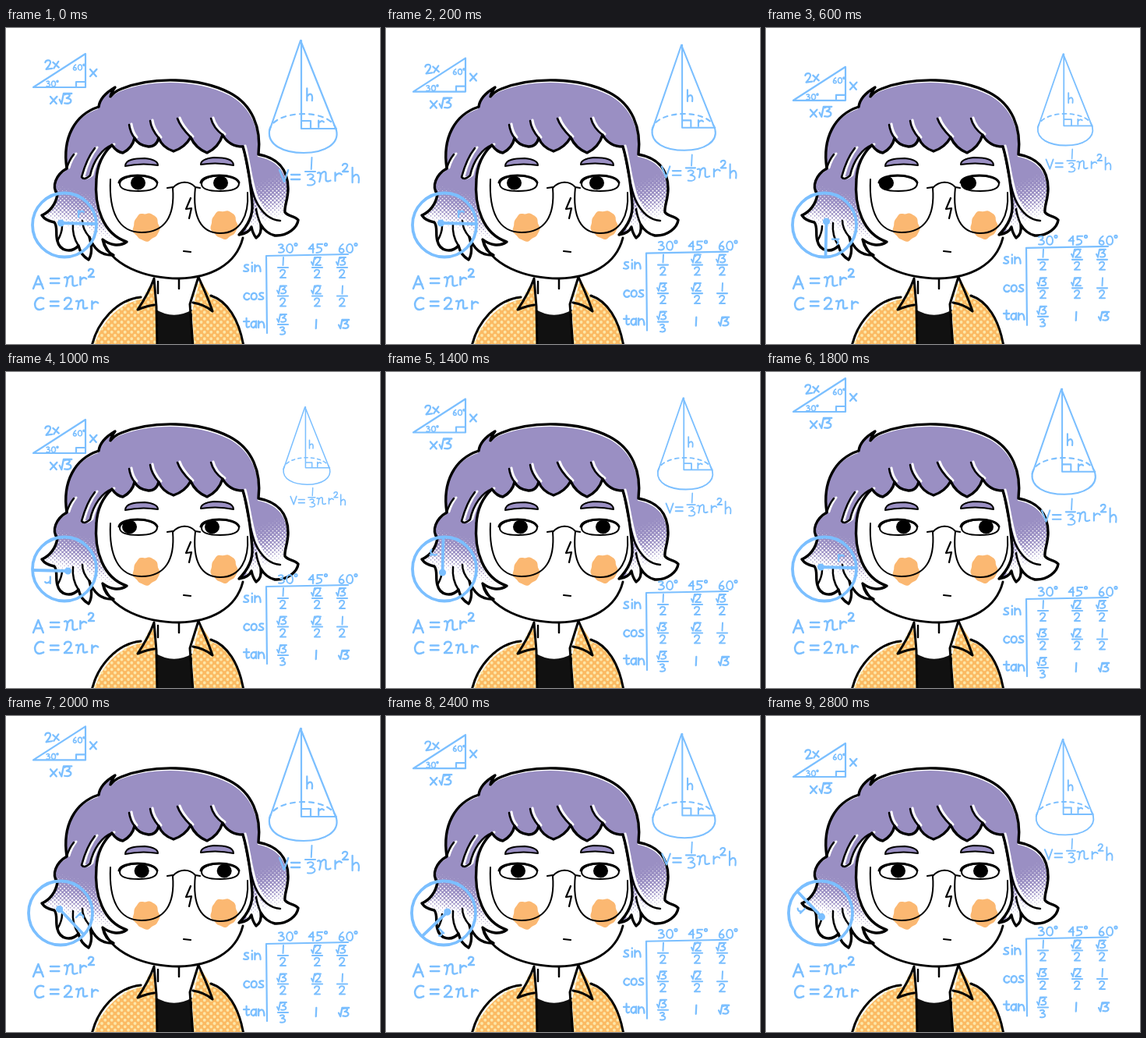
An HTML page that plays this animation: 480x405 px, repeating every 3000 ms.

```html
<!DOCTYPE html>
<html lang="en">
<head>
<meta charset="utf-8">
<title>Thinking about geometry</title>
<style>
html, body { margin: 0; width: 100%; height: 100%; overflow: hidden; background: #fff; }
svg { display: block; width: 100%; height: 100%; }
.ink { fill: none; stroke: #000; stroke-width: 3; stroke-linecap: round; stroke-linejoin: round; }
.chalk { fill: none; stroke: #7bbfff; stroke-width: 2.2; stroke-linecap: round; stroke-linejoin: round; }
</style>
</head>
<body>
<svg id="stage" viewBox="0 0 480 405" role="img" aria-label="Person surrounded by floating formulas"></svg>
<script>
const PURPLE = '#9a8fc3', ORANGE = '#fbb872', BLUE = '#7bbfff';

// Hand lettering: strokes in a 10-unit-high box, then the advance
const GLYPHS = {
  '0': ['M4 0C-1 0-1 10 4 10S8 0 4 0', 9],
  '1': ['M3 0L2.500 10', 6],
  '2': ['M0 2C1-1 7-1 6 3C5 6 2 8 0 10H7', 9],
  '3': ['M0 1C4-1 8 2 2 4.500C9 5 7 11 0 9.500', 9],
  '4': ['M5 0L0 5.500H6M5 0V10', 9],
  '5': ['M7 0H1V4C8 3 8 10 0 10', 9],
  '6': ['M5 0C0 3-1 10 3.500 10S6 3 1 6', 9],
  x: ['M0 3L6 10M6.500 3L0 10', 9],
  r: ['M1 3V10M1 6C3 3 5 3 6.500 4.500', 9],
  h: ['M1-2V10M1 6C4 2 7 3 6 10', 9],
  s: ['M5 3C0 2 0 5 3 6.500C7 8 5 11 0 9.500', 8],
  i: ['M1 4V10M1 .5V1', 4],
  n: ['M0 3V10M0 6C3 2 6 3 6 10', 8],
  c: ['M6 4C2 1-1 6 1 9C3 11 5 10 6 9', 8],
  o: ['M3 3C-1 4-1 10 3 10S7 3 3 3', 8],
  t: ['M3 0V8C3 10 5 10 6 9M0 3.500H6', 8],
  a: ['M5 4C0 1-2 9 2 10C5 10 5.500 7 5.500 3V10', 8],
  V: ['M0 0L4 10L7.500 0', 10],
  A: ['M0 10L4 0L8 10M1.500 6.500H7', 12],
  C: ['M7 1C2-1-1 4 .5 8C2 11 5 10 7 9', 12],
  'π': ['M0 2.500C3 1 3 5 1.500 10M2.500 4C5 0 7.500 1 7 4V8C7 10 9 10 11 9', 13],
  '=': ['M0 4H7.500M0 8H7.500', 12],
  '√': ['M0 6L2 10L4 0H12', 5],
  '°': ['M2-1C0-1 0 2 2 2S4-1 2-1', 4]
};

// x, y is the top left corner of the lettering
function write(str, x, y, size, weight = 2.3, tilt = 0) {
  const s = size / 10;
  let pen = 0, out = '';
  for (const ch of str) {
    const [d, adv] = GLYPHS[ch];
    out += `<path transform="translate(${pen})" d="${d}"/>`;
    pen += adv;
  }
  return `<g transform="translate(${x} ${y}) rotate(${tilt}) scale(${s})" stroke-width="${weight / s}">${out}</g>`;
}

function fraction(top, bottom, x, y, size = 10) {
  const wide = top.length > 1;
  return write(top, x - (wide ? 7 : 2), y - size - 3, size, 2) +
    `<path d="M${x - 6} ${y}H${x + 7}"/>` +
    write(bottom, x - 3, y + 3, size, 2);
}

const disc = (x, y, r) => `M${x - r} ${y}a${r} ${r} 0 1 0 ${2 * r} 0a${r} ${r} 0 1 0 ${-2 * r} 0`;
const path = (d, attrs = '') => `<path d="${d}" ${attrs}/>`;
const clip = (id, d) => `<clipPath id="${id}"><path d="${d}"/></clipPath>`;

// Staggered dots, radius given by position
function dots(x0, y0, x1, y1, gap, radius) {
  let d = '';
  for (let row = 0, y = y0; y < y1; row++, y += gap / 2) {
    for (let x = x0 + (row % 2) * gap / 2; x < x1; x += gap) {
      const r = radius(x, y);
      if (r > 0.2) d += disc(x, y, +r.toFixed(2));
    }
  }
  return d;
}

// Slightly uneven round blob
function blob(cx, cy, r) {
  let d = '';
  for (let i = 0; i < 48; i++) {
    const a = i * Math.PI / 24, q = r + 0.7 * Math.sin(5 * a) + 0.5 * Math.sin(9 * a + 1);
    d += `${i ? 'L' : 'M'}${(cx + q * Math.cos(a)).toFixed(1)} ${(cy + q * 1.06 * Math.sin(a)).toFixed(1)}`;
  }
  return d + 'Z';
}

const HAIR = 'M119 101C120 92 128 83 140 76C137 80 135 83 134 88C138 83 143 80 148 78' +
  'C188 62 248 63 287 83C316 98 328 128 324 162C347 166 362 180 362 206' +
  'C362 220 357 228 358 236C362 242 370 240 375 246C374 256 361 267 345 266C337 264 331 259 327 252' +
  'C328 260 326 266 321 269C317 264 316 260 315 255C312 262 306 264 299 265' +
  'C310 254 317 242 316 226C314 200 311 175 304 152C291 152 283 146 278 137Q273 153 258 160' +
  'C248 156 241 149 237 140Q230 153 215 158C206 155 199 149 196 141' +
  'Q193 152 183 152C174 151 168 147 165 141Q162 154 150 160Q142 159 136 150' +
  'C123 162 117 178 116 194C113 228 124 264 155 274C145 281 133 278 124 271' +
  'C126 281 131 288 138 291C124 292 113 284 107 268C111 282 110 291 106 297' +
  'C99 293 95 287 93 279C84 289 69 286 66 273C63 264 67 255 62 249' +
  'C56 248 50 246 46 240C56 236 64 226 66 213C58 203 64 188 78 180C72 141 88 111 119 101Z';
const COAT = 'M110 410C117 377 142 348 176 344L190 321L193 360L194 410ZM240 410L237 360L247 319L262 343' +
  'C284 350 299 373 305 410Z';
const EYES = [170, 275].map(x => `M${x - 24} 200C${x - 24} 186 ${x + 23} 186 ${x + 24} 199` +
  `C${x + 24} 206 ${x + 16} 209 ${x} 209S${x - 24} 206 ${x - 24} 200Z`);

const fade = (x, y) => {
  const t = x < 200 ? (y - 208 + (110 - x) * 0.28) / 62 : (y - 188 + (x - 335) * 0.4) / 66;
  return Math.min(2.9, t * 2.5);
};

function hair() {
  const strands = 'M136 150C123 155 112 170 108 189C102 194 99 194 97 191C101 176 106 164 114 154' +
    'M165 141C161 136 159 131 158 124M196 141C190 134 186 127 185 119M237 140C229 132 223 125 220 116' +
    'M278 137C270 131 265 124 263 116' +
    'M304 152C309 169 312 202 320 220C328 237 338 246 352 247M93 279C87 270 85 261 86 250' +
    'M107 268C101 261 98 254 98 247M78 180C80 172 83 167 87 162M327 252C324 245 322 240 321 232M66 273C70 266 72 260 72 254';
  return `<g clip-path="url(#hair)">${path(HAIR, `fill="${PURPLE}" transform="translate(-1 3)"`)}` +
    path(dots(40, 196, 165, 300, 5, fade) + dots(310, 186, 380, 272, 5, fade), 'fill="#fff"') +
    `<g transform="translate(3 -1)">${path(strands, 'class="ink" style="stroke:#fff"')}</g></g>` +
    path(strands, 'class="ink" style="stroke-width:2.5"') +
    path(HAIR, 'class="ink" style="stroke-width:3.4"');
}

function body() {
  return path('M191 360Q215 375 239 361V410H191Z', 'fill="#111"') +
    `<g clip-path="url(#coat)">${path(COAT, 'fill="#fbba63" transform="translate(2 3)"')}` +
    path(dots(106, 326, 310, 408, 8.5, () => 1.9), 'fill="#fde7a8"') + '</g>' +
    path('M110 408C117 377 142 348 173 345M263 343C284 350 299 373 305 408', 'class="ink"') +
    path('M190 321C184 338 177 349 169 361Q181 356 190 355M190 321L193 357L194 408' +
      'M247 319C253 333 260 347 265 363Q254 354 240 352M247 319L236 354L240 408', 'class="ink"') +
    path('M195 325V340M222 322V334', 'class="ink" style="stroke-width:2.500"');
}

function face() {
  const brow = 'M153 177C153 168 166 167 178 167C188 168 195 170 195 176C183 174 167 174 153 177Z';
  const eyes = EYES.map((d, i) =>
    path(d, 'fill="#fff"') +
    `<g clip-path="url(#eye${i})"><ellipse class="pupil" cx="${169.5 + i * 106}" cy="198.500" rx="9.500" ry="9"/></g>` +
    path(d, 'class="ink" style="stroke-width:2"') +
    path(`M${145 + i * 105} 198C${148 + i * 105} 186 ${189 + i * 105} 186 ${194 + i * 105} 198`, 'class="ink"')).join('');
  return path('M123 266C131 306 182 321 222 321C262 320 295 304 304 269', 'class="ink"') +
    path(blob(180, 255, 16.8) + blob(280, 252, 17), `fill="${ORANGE}"`) +
    `<g class="ink" style="stroke-width:2"><g fill="${PURPLE}">${path(brow)}${path(brow, 'transform="translate(445 -1) scale(-1 1)"')}</g></g>` +
    eyes +
    path('M134 194C132 235 144 262 174 262C204 262 217 241 214 205C222 196 235 195 243 204' +
      'M243 204C239 242 250 263 275 263C301 263 312 240 310 211M207 205L214 204M243 204L249 205', 'class="ink" style="stroke-width:2"') +
    path('M237 218L231 232L238 231L235 244M228 286L237 287', 'class="ink" style="stroke-width:2.200"');
}

const triangle = () =>
  path('M102 33L35 76H102ZM102 69H90V76') +
  write('2x', 50, 42, 11, 2.2, -8) + write('x', 108, 49, 13) + write('x√3', 57, 84, 13) +
  write('60°', 86, 47, 7, 1.6) + write('30°', 52, 68, 7, 1.6);

const cone = () =>
  path('M378 16L338 132C336 150 356 160 382 160C410 160 428 148 424 131ZM379 16V129H424M379 119H391V129') +
  path('M338 132C341 104 418 102 424 131', 'stroke-dasharray="6 6"') +
  write('h', 385, 80, 13) + write('r', 400, 115, 12) +
  write('V=', 351, 182, 15) + fraction('1', '3', 390, 184, 15) +
  write('π', 400, 182, 15) + write('r', 421, 181, 15) + write('2', 432, 174, 10) + write('h', 443, 182, 16);

const circle = () =>
  `<circle r="41" stroke-width="3.800"/>` + path('M-4.500-2.500L39-1.500', 'stroke-width="3.800"') +
  `<circle cx="-4.500" cy="-2.500" r="3.500" fill="${BLUE}"/>` + write('r', 17, -22, 12);

function table() {
  const rows = [['1/2', '√2/2', '√3/2'], ['√3/2', '√2/2', '1/2'], ['√3/3', '1', '√3']];
  let out = path('M439 290L334 292L335 391');
  ['30°', '45°', '60°'].forEach((s, i) => out += write(s, 350 + i * 38.5, 277, 11, 2));
  ['sin', 'cos', 'tan'].forEach((s, i) => out += write(s, 305, 300 + i * 36, 12));
  rows.forEach((row, j) => row.forEach((cell, i) => {
    const x = [355, 399, 431][i], y = 307 + j * 36.5, [a, b] = cell.split('/');
    out += b ? fraction(a, b, x, y) : write(a, x - 4, y - 6, 11);
  }));
  return out;
}

const areas = () =>
  write('A', 35, 318, 16, 2.5) + write('=', 57, 315, 15, 2.5) + write('π', 75, 316, 15, 2.5) +
  write('r', 94, 315, 14, 2.5) + write('2', 106, 309, 10, 2.5) +
  write('C', 37, 345, 16, 2.5) + write('=', 57, 345, 14, 2.5) + write('2', 75, 346, 14, 2.5) +
  write('π', 90, 347, 13, 2.5) + write('r', 109, 346, 14, 2.5);

const stage = document.getElementById('stage');
stage.innerHTML = `<defs>${clip('hair', HAIR)}${clip('coat', COAT)}${EYES.map((d, i) => clip('eye' + i, d)).join('')}</defs>` +
  body() + face() + hair() +
  `<g class="chalk">${areas()}<g id="triangle">${triangle()}</g><g id="cone">${cone()}</g>` +
  `<g id="circle">${circle()}</g><g id="table">${table()}</g></g>`;

const part = id => document.getElementById(id);
const pupils = stage.querySelectorAll('.pupil');

// Linear interpolation over [step, value] keys
function at(k, keys) {
  const i = Math.max(1, keys.findIndex(key => key[0] >= k));
  const [[a, u], [b, v]] = [keys[i - 1], keys[i]];
  return u + (v - u) * (k - a) / (b - a);
}

const LIFT = [[0, 0], [5, 28], [9, -25], [14, 2]];
const SCALE = [[0, 1], [5, 0.69], [10, 1], [14, 0.85]];
const SINK = [[0, 0], [5, -17], [9, -1], [10, 0], [14, -6.5]];
const GAZE = [[0, 0], [3, -15], [5, -11], [7, 3], [9, 7], [12, 0], [14, 0]];

function draw(ms) {
  const k = Math.floor(ms % 3000 / 200), s = at(k, SCALE);
  const turn = Math.max(0, k - 1) * 45;
  // The sheet swings sideways on the diagonals
  const sway = -4 * Math.max(0, Math.sin(turn * Math.PI / 90)) - 2 * Math.sin(turn * Math.PI / 180) ** 2 * (turn % 90 ? 1 : 0);
  const set = (id, v) => part(id).setAttribute('transform', v);
  set('triangle', `translate(0 ${at(k, LIFT)})`);
  set('cone', `translate(396.5 109) scale(${s}) translate(-396.5 -109)`);
  set('circle', `translate(${75 + sway} 252.500) rotate(${turn})`);
  set('table', `translate(0 ${at(k, SINK)})`);
  pupils.forEach(p => p.setAttribute('transform', `translate(${at(k, GAZE)})`));
}

const start = performance.now();
function tick() {
  draw(performance.now() - start);
  requestAnimationFrame(tick);
}
draw(0);
requestAnimationFrame(tick);
</script>
</body>
</html>
```
